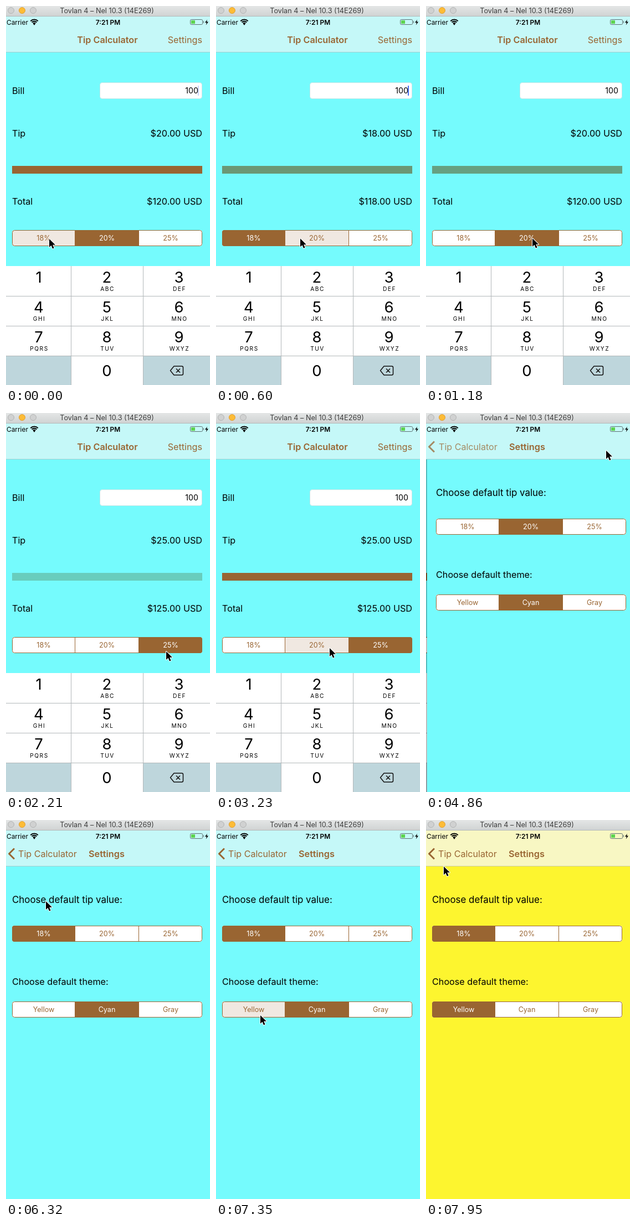
These frames come from a looping animation (368 px wide and 685 px high, 8 s). An HTML page with a canvas:

```html
<!DOCTYPE html>
<html lang="en">
<head>
<meta charset="utf-8">
<title>Tip Calculator</title>
<style>
html, body { margin: 0; width: 100%; height: 100%; overflow: hidden; }
canvas { display: block; }
</style>
</head>
<body>
<canvas id="stage" width="368" height="685"></canvas>
<script>
const ctx = document.getElementById('stage').getContext('2d');
const LOOP = 8000, STEP = 147.1;   // the screen refreshes once per STEP
const BROWN = '#996532', CYAN = '#75fbfd', YELLOW = '#fdf52f';
const PERCENT = [18, 20, 25];

// Pointer path: step, x, y
const PATH = [
  [0, 78, 421], [2, 80, 421], [5, 188, 420], [8, 192, 420], [9, 196, 421],
  [13, 288, 426], [15, 289, 431], [18, 286, 429], [21, 205, 425], [22, 205, 425],
  [24, 207, 424], [30, 325, 66], [33, 325, 68], [35, 322, 72], [40, 74, 201],
  [42, 74, 201], [43, 72, 147], [44, 110, 106], [46, 244, 190], [49, 82, 352],
  [51, 78, 354], [54, 32, 84]
];
// Bar colour as it fades in: progress, r, g, b
const FADE = [[0, 117, 251, 253], [.3, 104, 207, 192], [.65, 102, 156, 124], [1, 153, 101, 50]];
const FADE_STARTS = [-9, 1, 5.2, 13.2, 22.5], FADE_STEPS = 4.8;

function track(keys, at) {
  const i = keys.findIndex(key => key[0] > at);
  if (i < 0) return keys[keys.length - 1].slice(1);
  const a = keys[i - 1], b = keys[i], u = (at - a[0]) / (b[0] - a[0]);
  return a.slice(1).map((v, j) => v + (b[j + 1] - v) * u);
}

function rect(x, y, w, h, fill) {
  ctx.fillStyle = fill;
  ctx.fillRect(x, y, w, h);
}

// y is the middle of the capitals
function text(str, x, y, size, { color = '#000', align = 'left', weight = 400, spacing = 0 } = {}) {
  ctx.font = `${weight} ${size}px Inter, "Liberation Sans", sans-serif`;
  ctx.textAlign = align;
  ctx.letterSpacing = spacing + 'px';
  ctx.fillStyle = color;
  ctx.fillText(str, x, y + size * .364);
  ctx.letterSpacing = '0px';
}

function shape(d, { fill, stroke, width = 1 }, x = 0, y = 0) {
  const path = new Path2D(d);
  ctx.save();
  ctx.translate(x, y);
  ctx.lineWidth = width;
  ctx.lineJoin = 'round';
  if (stroke) { ctx.strokeStyle = stroke; ctx.stroke(path); }
  if (fill) { ctx.fillStyle = fill; ctx.fill(path); }
  ctx.restore();
}

function box(x, y, w, h, r) {
  ctx.beginPath();
  ctx.roundRect(x, y, w, h, r);
}

function segments(labels, x, y, selected, pressed) {
  const edges = [0, 113, 228, 343];
  ctx.save();
  box(x, y, 343, 29, 4);
  ctx.clip();
  rect(x, y, 343, 29, '#fff');
  labels.forEach((label, i) => {
    const left = x + edges[i], w = edges[i + 1] - edges[i] + 1;
    if (i === selected) rect(left, y, w, 29, BROWN);
    else if (i === pressed) rect(left, y, w, 29, '#f0e8e1');
    if (i) rect(left, y, 1, 29, BROWN);
    text(label, left + w / 2, y + 14.5, 12.6, { color: i === selected ? '#fff' : BROWN, align: 'center' });
  });
  ctx.restore();
  ctx.lineWidth = 1;
  ctx.strokeStyle = BROWN;
  box(x + .5, y + .5, 342, 28, 4);
  ctx.stroke();
}

function keypad() {
  const letters = ['', 'ABC', 'DEF', 'GHI', 'JKL', 'MNO', 'PQRS', 'TUV', 'WXYZ'];
  const centers = [59, 182, 312];
  rect(0, 470, 368, 215, '#fff');
  rect(0, 632, 117, 53, '#bed6dc');
  rect(248, 632, 120, 53, '#bed6dc');
  for (const y of [524, 578, 632]) rect(0, y, 368, 1, '#b3b8ba');
  for (const x of [117, 247]) rect(x, 470, 1, 215, '#b3b8ba');
  letters.forEach((str, i) => {
    const x = centers[i % 3], y = 490 + 54 * Math.floor(i / 3);
    text(i + 1, x, y, 27.5, { align: 'center' });
    text(str, x + 1, y + 21.5, 10.2, { align: 'center', spacing: 1.5 });
  });
  text('0', 182, 659, 27.5, { align: 'center' });
  shape('M303 651H317Q319.500 651 319.500 653.500V664.500Q319.500 667 317 667H303L296.500 659ZM307 655.500L314 662.500M314 655.500L307 662.500',
    { stroke: '#111', width: 1.5 });
}

function calculator(k, t) {
  const selected = k < 1 ? 1 : k < 5 ? 0 : k < 13 ? 1 : k < 23 ? 2 : 1;
  const pressed = k < 1 ? 0 : k === 4 ? 1 : k === 12 ? 2 : k === 21 || k === 22 ? 1 : -1;
  const right = { align: 'right' };
  rect(0, 84, 368, 601, CYAN);
  text('Bill', 11, 153, 16.2);
  text('Tip', 11, 230, 16.2);
  text('Total', 11, 353, 16.2);

  ctx.fillStyle = '#fff';
  box(169.5, 138.5, 184, 29, 4);
  ctx.fill();
  ctx.lineWidth = 1;
  ctx.strokeStyle = '#c3e6e7';
  ctx.stroke();
  text('100', 347, 153, 14.2, right);
  const blink = t % 1000;
  ctx.globalAlpha = blink < 40 ? .3 : blink < 480 ? 0 : 1;
  rect(346, 144, 2, 18, '#4a72f0');
  ctx.globalAlpha = 1;

  const percent = PERCENT[selected];
  text(`$${percent}.00 USD`, 354, 230, 16.2, right);
  text(`$${100 + percent}.00 USD`, 354, 353, 16.2, right);

  const start = FADE_STARTS.filter(s => s <= k).pop();
  const u = Math.min(1, (k - start) / FADE_STEPS);
  rect(11, 289, 343, 14, `rgb(${track(FADE, u * u * (3 - 2 * u)).map(Math.round)})`);
  segments(PERCENT.map(p => p + '%'), 11, 405, selected, pressed);
  keypad();
}

function settings(k, x, background) {
  rect(0, 84, 368, 601, background);
  text('Choose default tip value:', x, 144, 16.9);
  segments(PERCENT.map(p => p + '%'), x, 191, k < 41 ? 1 : 0, k === 40 ? 0 : -1);
  text('Choose default theme:', x, 292, 16.2);
  segments(['Yellow', 'Cyan', 'Gray'], x, 328, k < 51 ? 1 : 0, k === 50 ? 0 : -1);
}

function windowBar() {
  const shade = ctx.createLinearGradient(0, 0, 0, 19);
  shade.addColorStop(0, '#e4e6e6');
  shade.addColorStop(1, '#cfd2d2');
  rect(0, 0, 368, 19, shade);
  rect(0, 18, 368, 1, '#b4b9b9');
  [['#d0d1d1', '#b2b4b4'], ['#fdbc37', '#dfa033'], ['#d0d1d1', '#b2b4b4']].forEach(([fill, edge], i) => {
    ctx.beginPath();
    ctx.arc(9 + 20 * i, 8, 5.5, 0, 7);
    ctx.fillStyle = fill;
    ctx.fill();
    ctx.lineWidth = 1;
    ctx.strokeStyle = edge;
    ctx.stroke();
  });
  text('Tovlan 4 – Nel 10.3 (14E269)', 182, 8.5, 12.7, { color: '#3d3d3d', align: 'center' });
}

function statusBar() {
  text('Carrier', 1, 29.5, 11.9);
  for (const r of [3, 6.3, 9.5]) {
    ctx.beginPath();
    ctx.arc(51, 34, r, -Math.PI * .75, -Math.PI * .25);
    ctx.lineWidth = 2;
    ctx.strokeStyle = '#000';
    ctx.stroke();
  }
  ctx.beginPath();
  ctx.arc(51, 33, 1.4, 0, 7);
  ctx.fillStyle = '#000';
  ctx.fill();
  text('7:21 PM', 184, 29.5, 11.9, { weight: 600, align: 'center' });
  ctx.lineWidth = 1;
  ctx.strokeStyle = '#5c6f70';
  box(332.5, 24.5, 22, 9, 2);
  ctx.stroke();
  rect(334, 26, 7, 6, '#5ed450');
  rect(356, 27, 1, 4, '#5c6f70');
  shape('M363 24.500L359 30H361.800L360.800 34.500L365 28.500H362Z', { fill: '#000' });
}

function navBar(k, yellow) {
  rect(0, 19, 368, 64, yellow ? '#f8f7c3' : '#c5f8f8');
  rect(0, 83, 368, 1, yellow ? '#cfcd96' : '#a0cfd0');
  statusBar();
  const bold = { color: BROWN, weight: 600 };
  if (k < 33) {
    text('Tip Calculator', 183, 61, 16.2, { ...bold, align: 'center' });
    ctx.globalAlpha = k >= 30 ? .3 : 1;
    text('Settings', 354, 61, 16.2, { color: BROWN, align: 'right' });
  } else {
    const shift = k === 33 ? 1 : 0;
    text('Settings', 149 + shift, 61, 16.3, bold);
    ctx.globalAlpha = shift ? .75 : 1;
    shape('M15 51.500L5.500 61L15 70.500', { stroke: BROWN, width: 3 });
    text('Tip Calculator', 22 + shift, 61, 16.1, { color: BROWN });
  }
  ctx.globalAlpha = 1;
}

function pointer(k) {
  const [x, y] = track(PATH, k);
  shape('M0 0V15L3.500 11.800L6 17.500L8.600 16.400L6.200 10.800H11Z', { fill: '#000', stroke: '#fff', width: 2 }, x, y);
}

function draw(now) {
  const t = now % LOOP;
  const k = Math.floor((t + 8) / STEP);
  const yellow = k >= 51;
  if (k < 33) {
    calculator(k, t);
  } else if (k === 33) {
    // tail of the push: a dimmed sliver of the previous page remains
    ctx.save();
    ctx.translate(-106, 0);
    calculator(k, t);
    ctx.restore();
    rect(0, 84, 2, 601, 'rgba(0,0,0,.25)');
    ctx.save();
    ctx.beginPath();
    ctx.rect(2, 84, 366, 601);
    ctx.clip();
    settings(k, 18, CYAN);
    ctx.restore();
  } else {
    settings(k, 11, yellow ? YELLOW : CYAN);
  }
  navBar(k, yellow);
  windowBar();
  pointer(k);
}

const began = performance.now();
function tick() {
  draw(performance.now() - began);
  requestAnimationFrame(tick);
}
tick();
</script>
</body>
</html>
```
